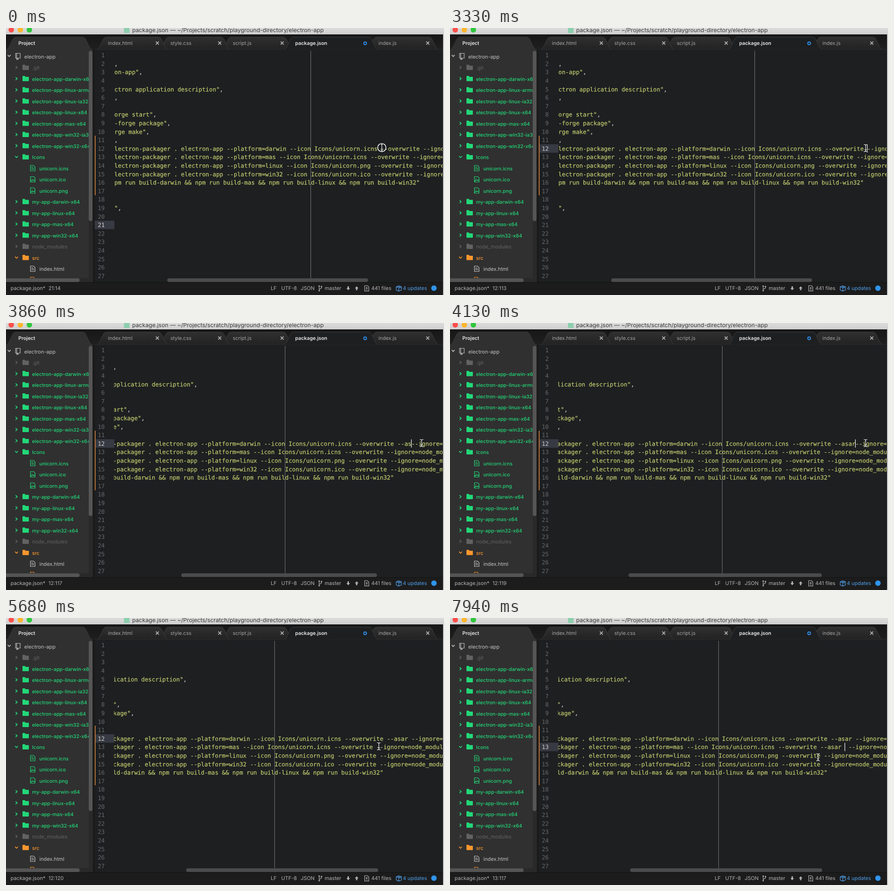
An HTML page for the animation above (8 s loop, 958 px wide and 585 px high).

```html
<!DOCTYPE html>
<html lang="en">
<head>
<meta charset="utf-8">
<title>Editor</title>
<style>
html, body { margin: 0; width: 100%; height: 100%; overflow: hidden; background: #1d1f21; }
svg { display: block; width: 958px; height: 585px; }
text { white-space: pre; font: 11.2px Inter, sans-serif; text-rendering: geometricPrecision; }
.title { font-size: 12.55px; }
.tab { font-size: 11px; }
.tab.on { font-size: 10.8px; font-weight: 600; }
.strong { font-size: 10.8px; font-weight: 500; }
.mono text { font: 12.75px "DejaVu Sans Mono", monospace; }
.code { fill: #bfc76d; stroke: #bfc76d; stroke-width: .25; }
.code tspan { fill: #c5c8c6; stroke: #c5c8c6; }
.num { fill: #66696b; text-anchor: end; }
.num.on { fill: #d0d2d0; }
.line { fill: none; stroke: currentColor; stroke-width: 1.2; }
.thick { stroke-width: 1.7; }
</style>
</head>
<body>
<svg viewBox="0 0 958 585">
  <defs>
    <linearGradient id="title" x2="0" y2="1"><stop stop-color="#dcdcdc"/><stop offset="1" stop-color="#cfcfcf"/></linearGradient>
    <linearGradient id="bar" x2="0" y2="1"><stop stop-color="#171717"/><stop offset="1" stop-color="#1f1f1f"/></linearGradient>
    <linearGradient id="tab" x2="0" y2="1"><stop stop-color="#303030"/><stop offset="1" stop-color="#222"/></linearGradient>
    <clipPath id="treeClip"><rect y="50" width="181" height="498"/></clipPath>
    <clipPath id="codeClip"><rect x="236.5" y="50" width="718.5" height="507"/></clipPath>
    <path id="beam" d="M-4-8Q-.5-8 0-6Q.5-8 4-8M0-6V6M-4 8Q-.5 8 0 6Q.5 8 4 8M-2.5 3.5H2.5"/>
  </defs>
  <g id="chrome"></g>
  <g id="tree" clip-path="url(#treeClip)"></g>
  <g class="mono">
    <rect id="mark" x="194" width="43" height="18.6" fill="#373a42"/>
    <rect x="194" y="236" width="2" height="130.5" fill="#b5713a"/>
    <g id="gutter"></g>
    <g clip-path="url(#codeClip)">
      <g id="code"></g>
      <rect id="guide" y="50" width="1" height="507" fill="#77797a"/>
      <rect id="caret" width="1.2" height="18" fill="#fff"/>
    </g>
  </g>
  <rect id="thumb" y="548.5" height="8" rx="4" fill="#4b4c4e"/>
  <g id="status"></g>
  <g id="pointer" fill="none" stroke="#fff">
    <circle id="ring" stroke-width="1.6"/>
    <use href="#beam" stroke="#111" stroke-width="2.4" opacity=".6"/>
    <use href="#beam" stroke-width="1.2"/>
  </g>
</svg>
<script>
const el = id => document.getElementById(id);
const set = (id, attrs) => { for (const k in attrs) el(id).setAttribute(k, attrs[k]); };
const rect = (x, y, w, h, fill, rx = 0) => `<rect x="${x}" y="${y}" width="${w}" height="${h}" fill="${fill}" rx="${rx}"/>`;
const dot = (x, y, r, fill) => `<circle cx="${x}" cy="${y}" r="${r}" fill="${fill}"/>`;
const label = (x, y, s, fill, cls = '') => `<text x="${x}" y="${y}" fill="${fill}" class="${cls}">${s}</text>`;
const stroke = (x, y, d, color, cls = '') => `<path class="line ${cls}" transform="translate(${x} ${y})" d="${d}" color="${color}"/>`;

// Window frame, tabs and panels
const tabShape = (l, r, fill) =>
  `<path d="M${l} 47Q${l + 3} 45 ${l + 5} 41L${l + 13} 24Q${l + 15} 20 ${l + 20} 20H${r - 20}Q${r - 15} 20 ${r - 13} 24L${r - 5} 41Q${r - 3} 45 ${r} 47" fill="${fill}" stroke="#3d3d3d"/>`;

function tabs() {
  let x = 200, back = '', front = '';
  for (const name of ['index.html', 'style.css', 'script.js', 'package.json', 'index.js']) {
    const on = name === 'package.json', width = on ? 182 : 136.5;
    if (on) front = rect(194, 46.5, 761, 1, '#363636') + tabShape(x, x + 203, '#1d1f21') +
      label(x + 23, 36.5, name, '#ececec', 'tab on') +
      `<circle cx="${x + 176}" cy="33.5" r="3" fill="none" stroke="#2f8fe8" stroke-width="2"/>`;
    else back = tabShape(x, x + 153, 'url(#tab)') + label(x + 23, 36.5, name, '#a6a6a6', 'tab') +
      stroke(x + 131, 33, 'M-3.3-3.3L3.3 3.3M3.3-3.3L-3.3 3.3', '#b5b5b5', 'thick') + back;
    x += width;
  }
  return back + front;
}

el('chrome').innerHTML =
  rect(0, 0, 958, 14, 'url(#title)') +
  ['#fc4f4a', '#fdb62c', '#2fc63c'].map((c, i) => dot(11.5 + i * 19.8, 4, 6, c)).join('') +
  rect(258, -1, 12, 12, '#8ccfae', 2) +
  label(276, 9.3, 'package.json — ~/Projects/scratch/playground-directory/electron-app', '#3c3c3c', 'title') +
  rect(0, 14, 956, 33, 'url(#bar)') +
  tabShape(2, 187, '#303030') + label(27, 36.5, 'Project', '#e6e6e6', 'tab on') + tabs() +
  rect(194, 47.5, 762, 510, '#1d1f21') +
  rect(0, 46.5, 190, 511, '#303030') + rect(190, 47, 4, 510, '#1a1a1a') +
  rect(181, 50, 9, 498, '#292929') + rect(181, 50, 8, 373, '#555', 4) +
  rect(0, 548, 190, 9, '#292929') + rect(-4, 548.5, 165, 8, '#555', 4) +
  rect(956, 14, 2, 571, '#d8d8d8');

// Project tree
const green = '#22d878', grey = '#626262', orange = '#fb962d', pale = '#c3c3c3';
const folder = 'M0 1.5Q0 .5 1 .5H5Q6 .5 6 1.5V2.5H13Q14 2.5 14 3.5V11Q14 12 13 12H1Q0 12 0 11Z';
const page = 'M.5.5H7L10.5 4V12.5H.5ZM2.5 4H6M2.5 6.5H8.5M2.5 9H8.5';
const picture = 'M.5.5H7.5L10.5 3.5V12.5H.5ZM1 11L4 7.5L6 9.5L8 7.5L10 10M3 4.5H4.5';
const right = 'M-2-3.2L1.5 0L-2 3.2', down = 'M-3.2-2L0 1.5L3.2-2';
const entries = `.git electron-app-darwin-x64 electron-app-linux-armv7l electron-app-linux-ia32
  electron-app-linux-x64 electron-app-mas-x64 electron-app-win32-ia32 electron-app-win32-x64
  Icons unicorn.icns unicorn.ico unicorn.png my-app-darwin-x64 my-app-linux-x64 my-app-mas-x64
  my-app-win32-x64 node_modules src index.html main.js`.split(/\s+/);

function entry(name, i) {
  const y = 87 + i * 24.5;
  const color = /git|node_/.test(name) ? grey : /src|main/.test(name) ? orange : /html/.test(name) ? pale : green;
  const text = x => label(x, y + 4, name, color, color === green || color === orange ? 'strong' : '');
  if (/\w\./.test(name)) return stroke(53, y - 7, /ico$|png/.test(name) ? picture : page, color) + text(73);
  return stroke(23, y - .5, /Icons|src/.test(name) ? down : right, color, 'thick') +
    `<path transform="translate(36 ${y - 7})" d="${folder}" fill="${color}"/>` + text(57);
}

el('tree').innerHTML = stroke(7, 61, down, pale, 'thick') +
  stroke(20.5, 55, 'M.5.5H10.5V11H.5ZM3 .5V11M3 11V14L4.5 12.8L6 14V11', pale) +
  label(40, 66.5, 'electron-app', pale) + entries.map(entry).join('');

// Status bar
const blue = '#4f9fe8', soft = '#b4b4b4';
const note = (x, s, color = soft) => label(x, 574.3, s, color);
const node = (x, y) => dot(x, y, 1.6, soft);
el('status').innerHTML = rect(0, 557, 956, 28, '#1c1c1d') + rect(0, 557, 956, 1, '#111') +
  note(10, 'package.json*') + note(93, '<tspan id="position"></tspan>') +
  note(579, 'LF') + note(602, 'UTF-8') + note(644.5, 'JSON') + note(697, 'master') + note(799, '441 files') +
  note(868, '4 updates', blue) +
  stroke(683, 564, 'M2 3V10M7 4V5Q7 7 4 7.5Q2 8 2 10', soft) + node(685, 565.5) + node(690, 566.5) + node(685, 575.5) +
  `<path d="M747 566h3v4h2.5l-4 4.5l-4-4.5h2.5zM765.5 574.5h3v-4h2.5l-4-4.5l-4 4.5h2.5z" fill="${soft}"/>` +
  stroke(784, 564, 'M.5.5H6.5L9.5 3.5V12.5H.5ZM5 3.5V8M2.8 5.8H7.2M2.8 10H7.2', soft) +
  stroke(853, 564, 'M.5 3L6 1L12 3V10L6 12.5L.5 10ZM.5 3L6 5L12 3M6 5V12.5M3 2L9 4V6.5', blue) +
  dot(936, 570, 6, '#2f94ea');

// Code: every row is written from column 24 on
const advance = 12.75 * .60205, rowTop = n => 50.1 + (n - 1) * 18.6;
const build = (platform, type, added = ' ') =>
  `lectron-packager . electron-app --platform=${platform} --icon Icons/unicorn.${type} --overwrite${added}--ignore=node_modules`;
const rows = {
  2: ',', 3: 'on-app",', 5: 'ctron application description",', 6: ',', 8: 'orge start",',
  9: '-forge package",', 10: 'rge make",', 11: ',',
  12: '', 13: '', 14: build('linux', 'png'), 15: build('win32', 'ico'),
  16: ['pm run build-darwin', 'npm run build-mas', 'npm run build-linux', 'npm run build-win32"'].join(' &amp;&amp; '),
  19: '",'
};
el('code').innerHTML = Object.entries(rows).map(([n, s]) =>
  `<text class="code" id="row${n}" y="${rowTop(n) + 14}">${s.replace(/,$/, '<tspan>,</tspan>')}</text>`).join('');
el('gutter').innerHTML = Array.from({ length: 27 }, (_, i) =>
  `<text class="num" id="num${i + 1}" x="216" y="${rowTop(i + 1) + 14}">${i + 1}</text>`).join('');

// What the user does
const clicks = [
  { down: 0, up: 350, line: 12, col: 101 },
  { down: 2800, up: 2970, line: 12, col: 112 },
  { down: 5980, up: 6130, line: 13, col: 108 }];
const bursts = [
  { at: 3480, line: 12, text: '--asar' }, { at: 4340, line: 12, text: ' ' },
  { at: 6520, line: 13, text: ' ' }, { at: 6970, line: 13, text: '--as' }, { at: 7440, line: 13, text: 'ar ' }];
const glides = [
  { from: 2120, to: 2560, x: 909, y: 263 }, { from: 5170, to: 5860, x: 805, y: 283 },
  { from: 7600, to: 7800, x: 796, y: 305 }, { from: 7800, to: 7940, x: 805, y: 305 }];
const keyTime = 125, blinkTime = 395;

const keys = bursts.flatMap(b => [...b.text].map((char, i) => ({ at: b.at + i * keyTime, line: b.line, char })));

function pointerAt(t) {
  let x = 822, y = 262;
  for (const g of glides) {
    const left = 1 - Math.min(1, Math.max(0, (t - g.from) / (g.to - g.from)));
    const p = 1 - left ** 1.7;
    x += (g.x - x) * p;
    y += (g.y - y) * p;
  }
  return [x, y];
}

function draw(now) {
  const t = now % 8000;
  const pressed = keys.filter(k => k.at <= t);
  const typed = line => pressed.filter(k => k.line === line).map(k => k.char).join('');
  const click = clicks.findLast(c => c.up <= t) || { up: 0, line: 21, col: 13 };
  const { line } = click, col = click.col + typed(line).length;
  const lastAction = Math.max(click.up, ...pressed.map(k => k.at));

  // Typing in the long row keeps the caret at the right margin
  const added = typed(12).length;
  const origin = added ? 886.8 - (112 + added) * advance : 52.8;

  el('row12').textContent = build('darwin', 'icns', ' ' + typed(12));
  el('row13').textContent = build('mas', 'icns', typed(13) + ' ');
  set('code', { transform: `translate(${origin + 24 * advance} 0)` });
  set('guide', { x: Math.floor(origin + 80 * advance) });
  set('caret', {
    x: Math.floor(origin + col * advance), y: rowTop(line) + .3,
    visibility: Math.floor((t - lastAction) / blinkTime) % 2 ? 'hidden' : 'visible'
  });
  set('mark', { y: rowTop(line) });
  for (const n of [12, 13, 21]) el('num' + n).classList.toggle('on', n === line);
  el('position').textContent = `${line}:${col + 1}`;

  const zoom = 718 / (1174 + added * advance);
  set('thumb', { x: 237 + (242 - origin) * zoom, width: 718 * zoom });

  const [x, y] = pointerAt(t), press = clicks.find(c => c.down <= t && t < c.up);
  set('pointer', { transform: `translate(${x} ${y})` });
  set('ring', { r: press ? 9 + 4 * (t - press.down) / (press.up - press.down) : 0 });
}

const start = performance.now();
function tick() {
  draw(performance.now() - start);
  requestAnimationFrame(tick);
}
tick();
</script>
</body>
</html>
```
